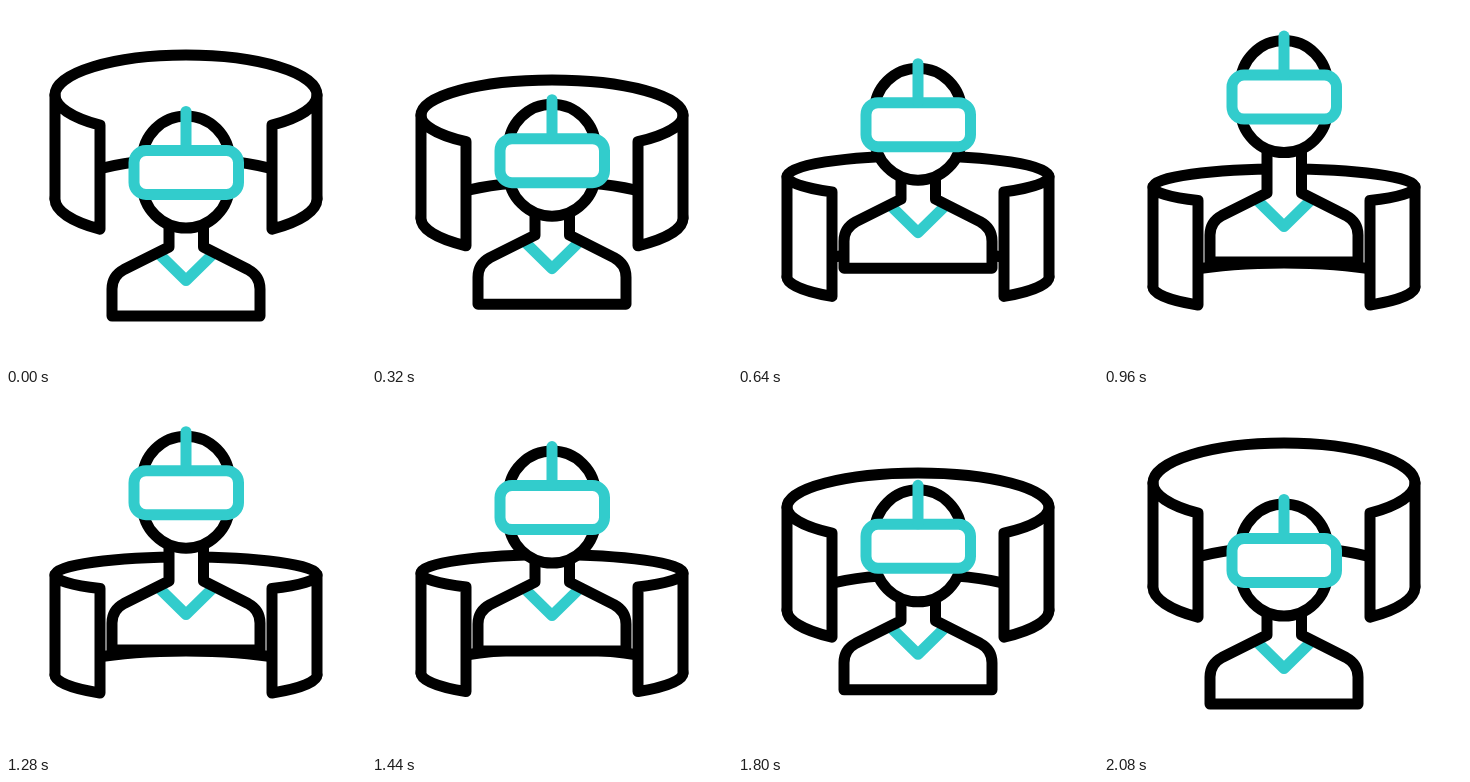
Recreate the animation shown at these times as an HTML page. Size 360 by 360 pixels, loop 2.12 s.

```html
<!DOCTYPE html>
<html lang="en">
<head>
<meta charset="utf-8">
<title>Virtual reality</title>
<style>
  html, body { margin: 0; width: 100%; height: 100%; overflow: hidden; background: #fff; }
  svg { display: block; width: 100vw; height: 100vh; }
  path, rect { stroke: #000; stroke-width: 11; stroke-linecap: round; stroke-linejoin: round; fill: none; }
  .solid { fill: #fff; }
  .teal { stroke: #32cccc; }
</style>
</head>
<body>
<svg viewBox="0 0 360 360">
  <path id="ring"/>
  <path id="bodyFill" class="solid" style="stroke: none"/>
  <path id="collar" class="teal" d="M152 247L180 274.5L208 247"/>
  <path id="bodyLine"/>
  <g id="head">
    <rect class="solid" x="136.5" y="110" width="87" height="112" rx="43.5"/>
    <rect class="solid teal" x="128" y="144.5" width="104.5" height="44" rx="12"/>
    <path class="teal" d="M180 105.5V144"/>
  </g>
  <path id="left" class="solid"/>
  <path id="right" class="solid"/>
</svg>
<script>
const LOOP = 2120, STEP = 40, HEAD_RISE = 77, BODY_RISE = 54;
const RX = 131, EDGE = 0.754;
const el = id => document.getElementById(id);
const lerp = (a, b, k) => a + (b - a) * k;
const ease = x => {
  const u = Math.min(1, Math.max(0, x));
  return u * u * (3 - 2 * u);
};

function lift(t) {
  return HEAD_RISE * (t < 1050 ? ease((t - 82) / 960) : 1 - ease((t - 1060) / 1020));
}

function panel(side, top, bottom) {
  const outer = 180 + side * RX, inner = 180 + side * 86;
  const sweep = side > 0 ? 1 : 0;
  return `M${outer} ${top.y}A${RX} ${top.r} 0 0 ${sweep} ${inner} ${top.y + EDGE * top.r}` +
    `V${bottom.y + EDGE * bottom.r}A${RX} ${bottom.r} 0 0 ${1 - sweep} ${outer} ${bottom.y}Z`;
}

const backArc = e => `M49 ${e.y}A${RX} ${e.r} 0 0 1 311 ${e.y}`;

function draw(t) {
  const head = lift(t);
  // the shoulders and ring stop early while the neck stretches on
  const body = Math.min(head, BODY_RISE);
  const k = body / BODY_RISE;
  const top = { y: lerp(89, 181, k), r: lerp(40, 18, k) };
  const bottom = { y: lerp(193, 281, k), r: lerp(40, 24, k) };

  el('ring').setAttribute('d', backArc(top) + backArc(bottom));
  el('left').setAttribute('d', panel(-1, top, bottom));
  el('right').setAttribute('d', panel(1, top, bottom));

  const neck = 219 - head + body;
  const torso = `M163 ${neck}V241L118 263.5Q106 270 106 283V310H254V283Q254 270 242 263.5L197.5 241V${neck}`;
  for (const id of ['bodyFill', 'bodyLine']) {
    el(id).setAttribute('d', torso);
    el(id).setAttribute('transform', `translate(0 ${-body})`);
  }
  el('collar').setAttribute('transform', `translate(0 ${-body})`);
  el('head').setAttribute('transform', `translate(0 ${-head})`);
}

const start = performance.now();
function tick() {
  const t = (performance.now() - start) % LOOP;
  draw(Math.floor(t / STEP) * STEP);
  requestAnimationFrame(tick);
}
tick();
</script>
</body>
</html>
```
